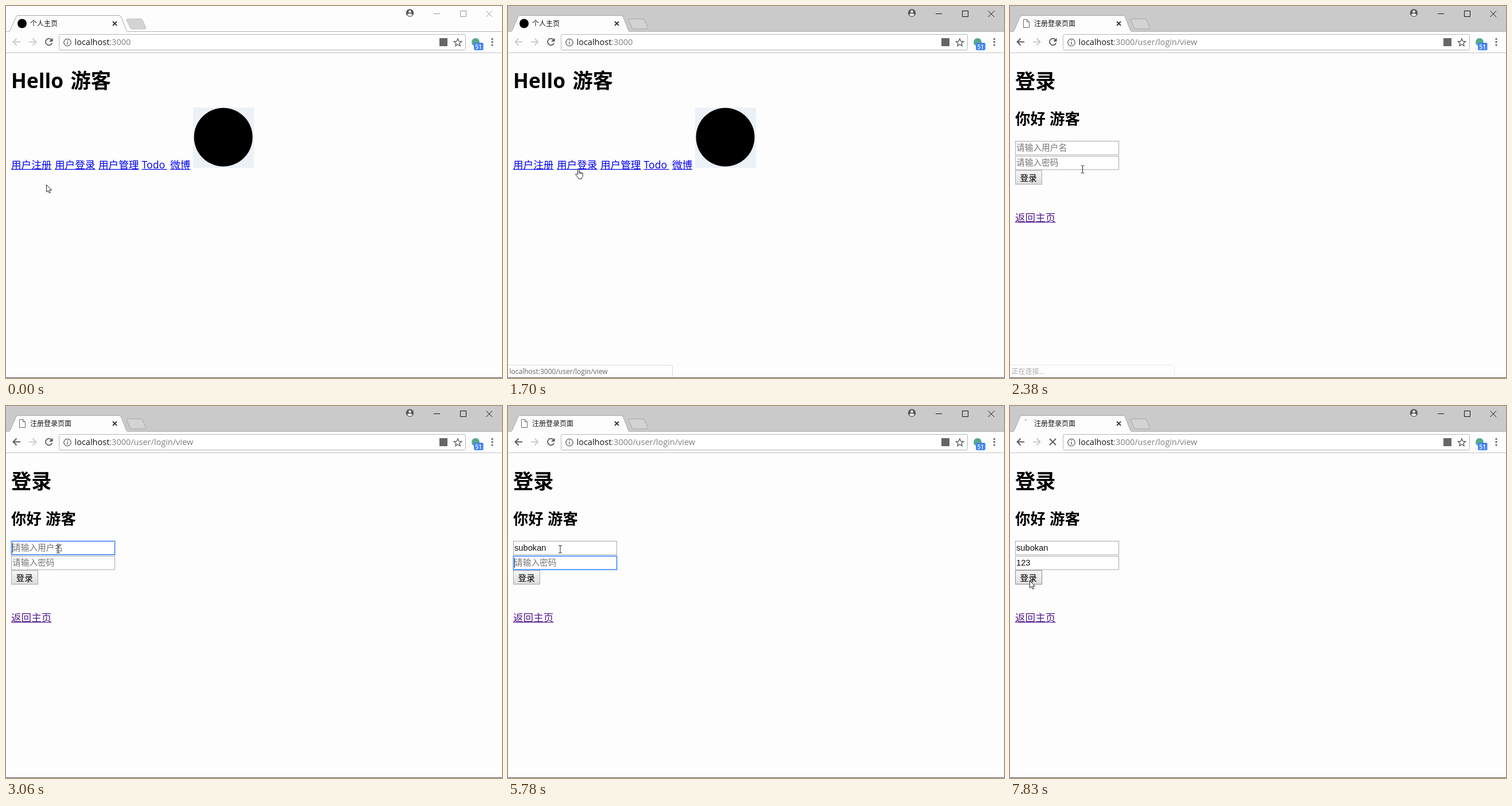
Animation of 864x648 px, one loop 8000 ms. Source, as an HTML page:

```html
<!DOCTYPE html>
<html lang="zh-CN">
<head>
<meta charset="utf-8">
<style>
  html, body { margin: 0; width: 100%; height: 100%; overflow: hidden; background: #fdfdfd; }
  svg { display: block; width: 864px; height: 648px; }
  text { font: 17.6px 'Open Sans', 'Noto Sans CJK SC', 'Noto Sans CJK JP', sans-serif; white-space: pre; }
  .h1 { font-size: 35.2px; font-weight: 700; }
  .h2 { font-size: 26.4px; font-weight: 700; }
  .small { font-size: 12px; }
  .field { font: 14.7px 'Liberation Sans', 'Noto Sans CJK SC', 'Noto Sans CJK JP', sans-serif; }
  .line { fill: none; stroke: #5a5a5a; stroke-width: 1.8; }
  .link { fill: #0000ee; }
  .visited { fill: #551a8b; }
  .cursor { fill: #fff; stroke: #222; stroke-width: 1; stroke-linejoin: round; }
</style>
</head>
<body>
<svg viewBox="0 0 864 648">
  <defs>
    <linearGradient id="buttonFill" x2="0" y2="1">
      <stop stop-color="#f6f6f6"/><stop offset="1" stop-color="#dddddd"/>
    </linearGradient>
  </defs>
  <rect width="864" height="648" fill="#fdfdfd"/>

  <!-- title bar and tab -->
  <rect id="titleBar" width="864" height="45"/>
  <path d="M0 44.5H864" stroke="#b4b4b4"/>
  <path d="M4 45Q7 44 8 41L17 20Q18.500 16.500 21 16.500H197Q199.500 16.500 201 20L209 41Q210 44 213 45Z" fill="#fdfdfd"/>
  <path d="M4 44.500Q7 44 8 41L17 20Q18.500 16.500 21 16.500H197Q199.500 16.500 201 20L209 41Q210 44 213 44.500" fill="none" stroke="#a6a6a6"/>
  <path id="newTab" d="M212 22.500H235Q237 22.500 238 25L243.500 37.500Q244 40 242 40H219Q217 40 216 37.500L210.500 25Q210 22.500 212 22.500Z" fill="#d3d3d3"/>
  <circle id="favicon" cx="28" cy="30.500" r="8"/>
  <path id="fileIcon" d="M23.500 23.500H29.500L33.500 27.500V37.500H23.500ZM29.500 23.500V27.500H33.500" fill="#fff" stroke="#666"/>
  <path id="spinner" d="M26 24.500Q27.500 23.500 29 24" fill="none" stroke="#888" stroke-width="1.300"/>
  <text id="title" class="small" x="42" y="34.500" fill="#111"/>
  <path d="M186 27L193 34M193 27L186 34" class="line" style="stroke:#333"/>

  <!-- window controls -->
  <circle cx="703.500" cy="12" r="6.800" fill="#5a5a5a"/>
  <circle cx="703.500" cy="9.800" r="2.200" fill="#fff"/>
  <path d="M699 15.500Q700 13.300 703.500 13.300T708 15.500Q706 17.600 703.500 17.600T699 15.500Z" fill="#fff"/>
  <path id="controls" d="M745 13.500H756M791.500 8.500H801.500V18.500H791.500ZM836.500 8.500L847 19M847 8.500L836.500 19" fill="none"/>

  <!-- toolbar -->
  <path id="back" class="line" d="M25 62.500H13M18.500 56.500L12.500 62.500L18.500 68.500"/>
  <path class="line" style="stroke:#cbcbcb" d="M40 62.500H52M46.500 56.500L52.500 62.500L46.500 68.500"/>
  <g id="reload">
    <path class="line" d="M79.300 58.800A5.800 5.800 0 1 0 80.300 64.300"/>
    <path d="M81.500 55.500V62H75Z" fill="#5a5a5a"/>
  </g>
  <path id="stop" class="line" d="M69 57L80 68M80 57L69 68"/>
  <rect x="92.500" y="49.500" width="708" height="27" rx="2" fill="#fff" stroke="#b6b6b6"/>
  <circle class="line" cx="107" cy="63.500" r="6.200" style="stroke-width:1.300"/>
  <path d="M107 59.500V61M107 62.500V67" stroke="#5a5a5a" stroke-width="1.400"/>
  <text x="119.500" y="68" style="font-size:14.500px" fill="#111">localhost<tspan id="path" fill="#808080"/></text>
  <rect x="755" y="56" width="14" height="14" fill="#666"/>
  <path class="line" style="stroke-width:1.400" d="M787 57L788.800 61.400L793.500 61.800L789.900 64.900L791 69.500L787 67L783 69.500L784.100 64.900L780.500 61.800L785.200 61.400Z"/>
  <circle cx="818" cy="63" r="7" fill="#55a98a"/>
  <rect x="815" y="64" width="16.500" height="13" rx="2" fill="#4285f4"/>
  <text x="823.300" y="74.500" text-anchor="middle" fill="#fff" style="font-size:10px;font-weight:600">51</text>
  <g fill="#5a5a5a"><circle cx="847" cy="57.500" r="1.600"/><circle cx="847" cy="62.700" r="1.600"/><circle cx="847" cy="68" r="1.600"/></g>
  <path d="M0 81.500H864" stroke="#c4c4c4"/>

  <g id="home">
    <text class="h1" x="9" y="143">Hello<tspan x="112.500">游客</tspan></text>
    <rect x="326" y="177" width="106" height="105" fill="#ecf1f7"/>
    <circle cx="378.500" cy="228.500" r="51"/>
    <g id="links" class="link"></g>
  </g>

  <g id="login">
    <text class="h1" x="9" y="144">登录</text>
    <text class="h2" x="9" y="205.500">你好<tspan x="69">游客</tspan></text>
    <g id="fields"></g>
    <rect id="button" x="9.500" y="286.500" width="46" height="24" fill="url(#buttonFill)"/>
    <text class="field" x="17.500" y="304.500">登录</text>
    <g id="returnLink" class="visited"></g>
  </g>

  <g id="bubble">
    <path d="M0 625.500H283Q286.500 625.500 286.500 629V648H0" fill="#fdfdfd" stroke="#dcdcdc"/>
    <text id="status" class="small" x="2.500" y="640.500" fill="#666"/>
  </g>
  <path d="M0 647.500H864" stroke="#5c5c5c"/>

  <path id="arrow" class="cursor" d="M.5 .5V13L3.400 10.300L5.300 14.900L7.400 14L5.500 9.600H9.400Z"/>
  <path id="hand" class="cursor" d="M4.500 10.500V2Q4.500 .5 5.700 .5T7 2V6.500Q8 5.500 9.200 7Q10.500 6.200 11.300 7.800Q13.300 7.200 13.300 9.500V12.500Q13.300 14.500 11.500 16.500V18H5.500V16.500L1 11Q.3 9.600 1.500 9.200Q2.600 9 4.500 11.500M7 6.500V9M9.200 7V9.500M11.300 7.800V9.800"/>
  <path id="beam" d="M-3 -6.500H-1L0 -5.500L1 -6.500H3M-3 6.500H-1L0 5.500L1 6.500H3M0 -5.500V5.500" fill="none" stroke="#222"/>
</svg>
<script>
const LOOP = 8000;
const $ = id => document.getElementById(id);
const show = (id, on) => $(id).style.display = on ? '' : 'none';
const set = (id, attrs) => { for (const k in attrs) $(id).setAttribute(k, attrs[k]); };

const link = (label, x, y, width) =>
  `<text x="${x}" y="${y}">${label}</text><rect x="${x}" y="${y + 1.5}" width="${width}" height="1.2"/>`;
$('links').innerHTML = [['用户注册', 9, 70.5], ['用户登录', 85, 70.5], ['用户管理', 161, 70.5], ['Todo', 236.5, 44], ['微博', 286, 35.2]]
  .map(([label, x, width]) => link(label, x, 282.5, width)).join('');
$('returnLink').innerHTML = link('返回主页', 9, 374.5, 70.5);

const fields = [['user', 235.5, '请输入用户名'], ['pass', 261.5, '请输入密码']];
$('fields').innerHTML = fields.map(([id, y]) =>
  `<rect id="${id}Box" x="9.5" y="${y}" width="180" height="23.5" fill="#fff"/>
   <text id="${id}Text" class="field" x="11" y="${y + 16.5}"/>
   <path id="${id}Caret" stroke="#111"/>`).join('');

// Each step changes only the named properties of the state.
const steps = [
  [0, { page: 'home', active: false, loading: false, status: '', fade: 1, focus: '', caret: true,
        user: '', pass: '', hover: false, cursor: ['arrow', 70, 311] }],
  [1020, { cursor: ['arrow', 55, 286] }],
  [1360, { cursor: ['hand', 107, 283] }],
  [1700, { cursor: ['hand', 117, 283], active: true, status: 'localhost:3000/user/login/view' }],
  [2040, { loading: true, status: '正在连接...' }],
  [2380, { page: 'login', loading: false, fade: 0.55, cursor: ['beam', 126.5, 284.5] }],
  [2720, { status: '', cursor: ['beam', 95.5, 252] }],
  [3060, { focus: 'user', cursor: ['beam', 91, 249.5] }],
  [3750, { caret: false }],
  [4090, { caret: true }],
  [4420, { user: 's' }],
  [4760, { user: 'sub' }],
  [5100, { user: 'subo' }],
  [5440, { user: 'subokan' }],
  [5780, { focus: 'pass' }],
  [6460, { pass: '1' }],
  [6800, { pass: '12' }],
  [7140, { pass: '123' }],
  [7480, { hover: true, cursor: ['arrow', 34, 304] }],
  [7830, { focus: '', loading: true }],
];

function drawField(state, [id, y, placeholder]) {
  const value = state[id], focused = state.focus === id, text = $(id + 'Text');
  text.textContent = value || placeholder;
  text.setAttribute('fill', value ? '#111' : '#757575');
  set(id + 'Box', { stroke: focused ? '#4d90fe' : '#a9a9a9', 'stroke-width': focused ? 1.8 : 1 });
  show(id + 'Caret', focused && state.caret);
  const x = value ? Math.floor(11 + text.getComputedTextLength()) + 0.5 : 11.5;
  set(id + 'Caret', { d: `M${x} ${y + 3.5}V${y + 20}` });
}

function draw(time) {
  const state = Object.assign({}, ...steps.filter(([at]) => at <= time).map(step => step[1]));
  const home = state.page === 'home';

  set('titleBar', { fill: state.active ? '#cacaca' : '#fdfdfd' });
  set('newTab', { stroke: state.active ? '#a6a6a6' : '#bdbdbd' });
  set('controls', { stroke: state.active ? '#111' : '#999' });
  $('back').style.stroke = home ? '#cbcbcb' : '#5a5a5a';
  $('title').textContent = home ? '个人主页' : '注册登录页面';
  $('path').textContent = home ? ':3000' : ':3000/user/login/view';
  show('favicon', home && !state.loading);
  show('fileIcon', !home && !state.loading);
  show('spinner', state.loading);
  show('stop', state.loading);
  show('reload', !state.loading);

  show('home', home);
  show('login', !home);
  if (!home) fields.forEach(field => drawField(state, field));
  set('button', { stroke: state.hover ? '#8c8c8c' : '#a9a9a9' });

  show('bubble', state.status);
  set('bubble', { opacity: state.fade });
  $('status').textContent = state.status;

  const [shape, x, y] = state.cursor;
  for (const id of ['arrow', 'hand', 'beam']) show(id, id === shape);
  set(shape, { transform: `translate(${x} ${y})` });
}

const start = performance.now();
function tick() {
  draw((performance.now() - start) % LOOP);
  requestAnimationFrame(tick);
}
tick();
</script>
</body>
</html>
```
